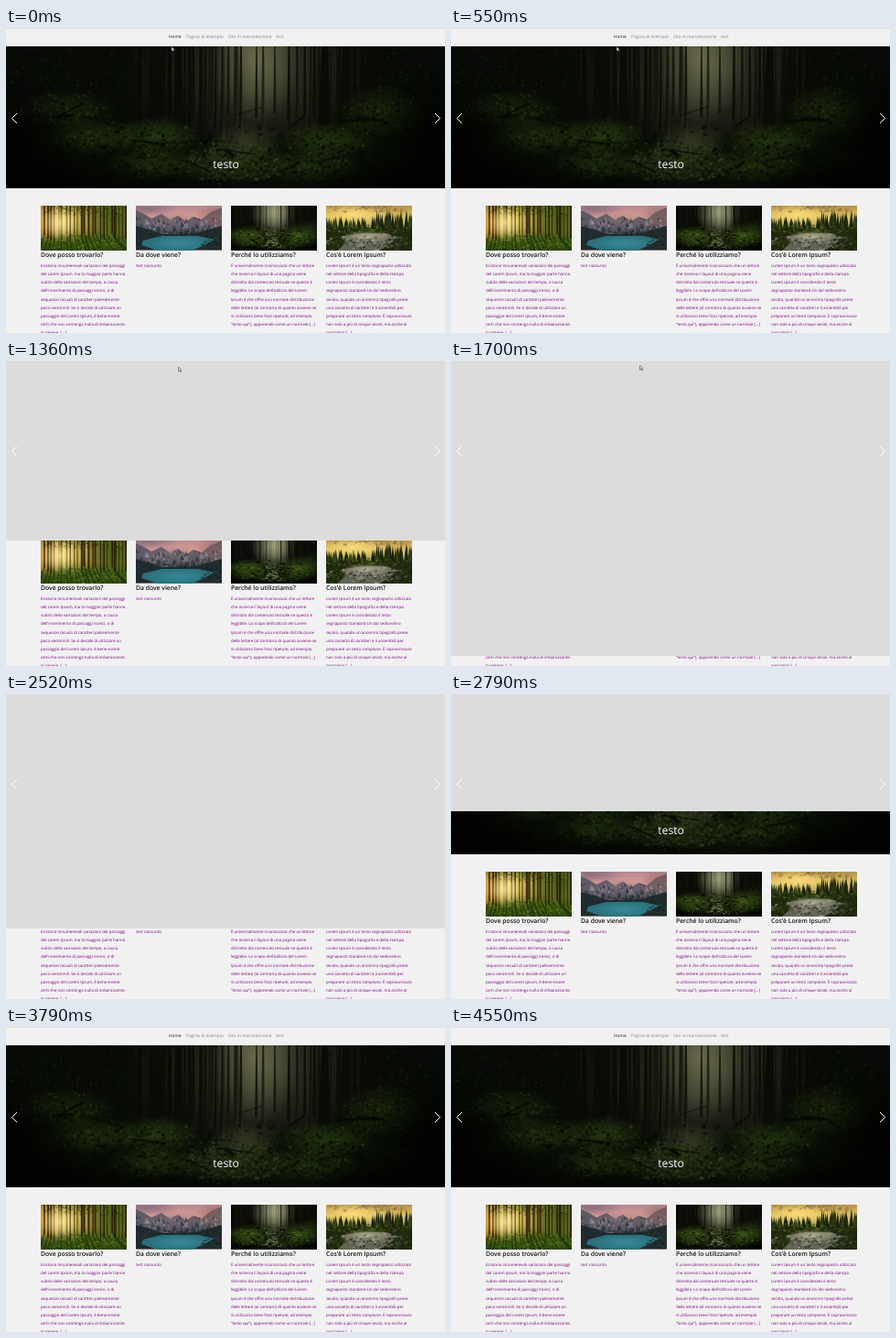
These frames come from a looping animation (480 px wide and 333 px high, 4610 ms). An HTML page with a canvas:

```html
<!DOCTYPE html>
<html lang="it">
<head>
<meta charset="utf-8">
<title>Transizione di pagina</title>
<style>
html, body { margin: 0; width: 100%; height: 100%; overflow: hidden; background: #f1f1f1; }
canvas { display: block; width: 480px; height: 333px; }
</style>
</head>
<body>
<canvas id="stage" width="480" height="333"></canvas>
<script>
const W = 480, H = 333, LOOP = 4610;
const ctx = document.getElementById('stage').getContext('2d');

function layer(w, h, paint) {
  const c = document.createElement('canvas');
  c.width = w;
  c.height = h;
  paint(c.getContext('2d'), w, h);
  return c;
}

function seeded(a) {
  return () => {
    a = (a + 0x6D2B79F5) | 0;
    let t = Math.imul(a ^ (a >>> 15), 1 | a);
    t = (t + Math.imul(t ^ (t >>> 7), 61 | t)) ^ t;
    return ((t ^ (t >>> 14)) >>> 0) / 4294967296;
  };
}

function glow(g, x, y, rx, ry, rgb, alpha) {
  g.save();
  g.translate(x, y);
  g.scale(rx, ry);
  const r = g.createRadialGradient(0, 0, 0, 0, 0, 1);
  r.addColorStop(0, `rgba(${rgb},${alpha})`);
  r.addColorStop(0.5, `rgba(${rgb},${alpha * 0.55})`);
  r.addColorStop(1, `rgba(${rgb},0)`);
  g.fillStyle = r;
  g.fillRect(-1, -1, 2, 2);
  g.restore();
}

function fade(g, w, h, colors) {
  const l = g.createLinearGradient(0, 0, 0, h);
  colors.forEach((c, i) => l.addColorStop(i / (colors.length - 1), c));
  g.fillStyle = l;
  g.fillRect(0, 0, w, h);
}

function shape(g, color, pts) {
  g.fillStyle = color;
  g.beginPath();
  for (let i = 0; i < pts.length; i += 2) g.lineTo(pts[i], pts[i + 1]);
  g.fill();
}

// Scatter small specks inside an ellipse, denser towards its middle.
function specks(g, rnd, n, x, y, rx, ry, size, color) {
  for (let i = 0; i < n; i++) {
    const a = rnd() * 6.283, r = Math.pow(rnd(), 0.7);
    g.fillStyle = color(rnd());
    g.beginPath();
    g.ellipse(x + Math.cos(a) * r * rx, y + Math.sin(a) * r * ry,
      size * (0.6 + rnd()), size * (0.3 + rnd() * 0.5), rnd() - 0.5, 0, 6.283);
    g.fill();
  }
}

const tone = (hue, sat, low, range, alpha = 0.6) => v => `hsla(${hue},${sat}%,${low + v * range}%,${alpha})`;
const moss = tone(84, 52, 5, 17);
const fern = tone(100, 40, 3, 9);
const stone = tone(72, 14, 5, 20);
const shade = v => `rgba(3,6,2,${0.3 + v * 0.5})`;

// A mossy mound: soft light, leaf texture, then dark gaps.
function mound(g, rnd, x, y, rx, ry, light) {
  glow(g, x, y, rx * 1.2, ry * 1.3, '50,72,20', light);
  specks(g, rnd, rx * ry * 0.16, x, y, rx, ry, 1.3, moss);
  specks(g, rnd, rx * ry * 0.08, x, y + ry * 0.4, rx, ry, 1.6, shade);
}

const forest = layer(480, 155, (g, w, h) => {
  const rnd = seeded(11);
  g.fillStyle = '#070a06';
  g.fillRect(0, 0, w, h);
  glow(g, 288, 22, 115, 95, '70,74,52', 0.7);
  glow(g, 272, 12, 50, 75, '135,135,98', 0.65);
  glow(g, 195, 35, 75, 70, '42,50,26', 0.5);
  specks(g, rnd, 500, 75, 45, 95, 55, 1.5, fern);
  specks(g, rnd, 300, 405, 45, 80, 50, 1.5, fern);

  for (let i = 0; i < 78; i++) {
    const x = 60 + rnd() * 345, mid = Math.max(0, 1 - Math.abs(x - 275) / 110);
    const foot = 72 + rnd() * 32, wide = 0.8 + rnd() * (3.6 - mid * 1.8);
    shape(g, `hsla(62,20%,${3 + mid * 7 * rnd()}%,.85)`, [x, 0, x + wide, 0, x + wide + 1, foot, x - 1, foot]);
    g.fillStyle = `rgba(112,110,78,${mid * 0.3})`;
    g.fillRect(x + wide, 0, 0.7, foot);
  }
  for (const [x, wide] of [[128, 12], [158, 6], [186, 5], [345, 7], [368, 6]])
    shape(g, '#080b06', [x, 0, x + wide, 0, x + wide + 3, 104, x - 4, 104]);

  shape(g, 'rgba(9,15,5,.85)', [0, 86, 70, 72, 140, 84, 215, 104, 250, 108, 285, 98, 335, 96, 375, 78, 425, 58, 480, 50, 480, 155, 0, 155]);
  mound(g, rnd, 62, 68, 48, 17, 0.4);
  mound(g, rnd, 95, 98, 48, 16, 0.45);
  mound(g, rnd, 165, 98, 42, 17, 0.65);
  mound(g, rnd, 160, 128, 46, 15, 0.45);
  mound(g, rnd, 350, 103, 45, 16, 0.65);
  mound(g, rnd, 410, 72, 42, 24, 0.4);
  mound(g, rnd, 335, 131, 48, 16, 0.5);
  mound(g, rnd, 250, 127, 58, 20, 0.6);
  glow(g, 262, 104, 42, 22, '86,92,58', 0.5);
  specks(g, rnd, 240, 245, 128, 52, 24, 2, stone);
  specks(g, rnd, 150, 262, 120, 62, 26, 1.5, moss);
  specks(g, rnd, 200, 240, 118, 210, 36, 2.2, shade);

  g.strokeStyle = 'rgba(5,8,4,.85)';
  for (let i = 0; i < 16; i++) {
    const x = 30 + rnd() * 400, y = 75 + rnd() * 60;
    g.lineWidth = 0.8 + rnd() * 2;
    g.beginPath();
    g.moveTo(x, y);
    g.lineTo(x + 15 + rnd() * 35, y + rnd() * 30 - 15);
    g.stroke();
  }

  glow(g, 0, 110, 90, 85, '0,0,0', 0.9);
  glow(g, 480, 105, 85, 90, '0,0,0', 0.95);
  glow(g, 40, 155, 150, 42, '0,0,0', 1);
  glow(g, 440, 155, 140, 40, '0,0,0', 1);
  glow(g, 200, 162, 120, 24, '0,0,0', 0.7);
});

const sunnyWood = (g, w, h) => {
  const rnd = seeded(5);
  fade(g, w, h, ['#5c641a', '#8c842a', '#7c7a20', '#3d5a12', '#2f4d0c']);
  glow(g, 24, 16, 42, 27, '255,220,110', 0.9);
  glow(g, 4, 20, 18, 24, '225,145,35', 0.7);
  glow(g, 82, 12, 34, 30, '58,84,20', 0.85);
  specks(g, rnd, 260, 47, 40, 50, 9, 1.4, tone(80, 62, 10, 28, 0.65));
  specks(g, rnd, 200, 55, 3, 54, 10, 1.4, tone(70, 58, 10, 26, 0.6));
  for (let i = 0; i < 23; i++) {
    const x = 1 + i * 4.1 + rnd() * 2.5, foot = 30 + rnd() * 10, wide = 0.7 + rnd() * 1.9;
    g.fillStyle = `rgba(${34 + rnd() * 22},28,9,.9)`;
    g.fillRect(x, 0, wide, foot);
    shape(g, 'rgba(18,32,6,.5)', [x, foot, x + wide, foot, x + (x - 24) * 0.25 + wide, 49, x + (x - 24) * 0.25, 49]);
  }
  glow(g, 20, 19, 20, 18, '255,238,160', 0.8);
};

const lake = (g, w, h) => {
  const rnd = seeded(8);
  fade(g, w, h, ['#b98791', '#dba193', '#c9908a', '#7d6c74']);
  glow(g, 12, 3, 35, 9, '118,96,118', 0.7);
  shape(g, '#5d5a64', [0, 5, 9, 9, 17, 14, 28, 9, 37, 15, 46, 11, 55, 17, 63, 12, 72, 15, 82, 7, 94, 2, 94, 36, 0, 36]);
  glow(g, 88, 12, 24, 16, '140,98,92', 0.7);
  glow(g, 40, 16, 34, 8, '140,118,124', 0.5);
  for (let i = 0; i < 95; i++) {
    const x = rnd() * 94, y = 11 + rnd() * 17, s = 1 + rnd() * 3;
    shape(g, rnd() > 0.62 ? 'rgba(165,160,168,.5)' : 'rgba(36,42,50,.55)', [x, y, x + s, y + s * 1.6, x - s * 0.4, y + s * 1.8]);
  }
  shape(g, '#1f2b2d', [0, 22, 14, 26, 30, 31, 50, 31, 70, 29, 94, 22, 94, 48, 0, 48]);
  specks(g, rnd, 110, 47, 30, 48, 4, 1.2, tone(165, 20, 8, 16));
  shape(g, '#29717d', [8, 38, 28, 33, 68, 33, 86, 37, 72, 44, 62, 49, 24, 49, 6, 43]);
  glow(g, 47, 41, 34, 8, '62,148,158', 0.7);
  specks(g, rnd, 70, 90, 42, 18, 8, 1.3, tone(170, 18, 8, 18));
};

const smallForest = g => {
  const rnd = seeded(31);
  g.drawImage(forest, 115, 0, 302, 155, 0, 0, 94, 49);
  glow(g, 46, 8, 24, 24, '190,192,150', 0.65);
  for (let i = 0; i < 22; i++) {
    g.fillStyle = 'rgba(14,17,8,.75)';
    g.fillRect(rnd() * 94, 0, 0.6 + rnd() * 1.6, 24 + rnd() * 8);
  }
  glow(g, 22, 33, 28, 12, '80,115,28', 0.55);
  glow(g, 76, 32, 28, 14, '76,110,28', 0.55);
  specks(g, rnd, 150, 47, 35, 46, 12, 1.3, tone(82, 50, 8, 24));
  specks(g, rnd, 45, 46, 38, 13, 10, 1.3, tone(70, 15, 18, 40));
  specks(g, rnd, 110, 47, 36, 48, 13, 1.3, shade);
};

const river = (g, w, h) => {
  const rnd = seeded(23);
  fade(g, w, h, ['#b99243', '#e0c264', '#b7a850', '#3e481d', '#2b3514']);
  glow(g, 30, 9, 36, 11, '255,225,125', 0.85);
  specks(g, rnd, 60, 45, 3, 50, 4, 1.8, tone(38, 35, 30, 28, 0.5));
  for (let i = 0; i < 75; i++) {
    const x = rnd() * 94, tall = (x > 50 ? 14 : 7) + rnd() * 9;
    shape(g, `hsl(${74 + rnd() * 18},45%,${7 + rnd() * 13}%)`, [x, 27 - tall, x + 2.6, 30, x - 2.6, 30]);
  }
  shape(g, '#1f290d', [0, 24, 94, 24, 94, 49, 0, 49]);
  specks(g, rnd, 170, 47, 26, 50, 5, 1.3, tone(78, 52, 9, 24));
  shape(g, '#626456', [14, 34, 38, 30, 66, 30, 80, 35, 70, 42, 58, 49, 12, 49, 22, 40]);
  glow(g, 45, 34, 28, 7, '200,194,158', 0.8);
  specks(g, rnd, 130, 46, 40, 46, 9, 1.5, tone(58, 10, 8, 58));
  specks(g, rnd, 90, 82, 41, 20, 9, 1.5, tone(82, 38, 5, 17));
  specks(g, rnd, 60, 8, 41, 16, 9, 1.5, tone(82, 42, 7, 20));
};

const cards = [
  [38, sunnyWood, 'Dove posso trovarlo?', [
    'Esistono innumerevoli variazioni dei passaggi',
    'del Lorem Ipsum, ma la maggior parte hanno',
    'subito delle variazioni del tempo, a causa',
    "dell'inserimento di passaggi ironici, o di",
    'sequenze casuali di caratteri palesemente',
    'poco verosimili. Se si decide di utilizzare un',
    'passaggio del Lorem Ipsum, è bene essere',
    'certi che non contenga nulla di imbarazzante.',
    'In genere, [...]']],
  [142, lake, 'Da dove viene?', ['test riassunto']],
  [246, smallForest, 'Perché lo utilizziamo?', [
    'È universalmente riconosciuto che un lettore',
    'che osserva il layout di una pagina viene',
    'distratto dal contenuto testuale se questo è',
    "leggibile. Lo scopo dell'utilizzo del Lorem",
    'Ipsum è che offre una normale distribuzione',
    'delle lettere (al contrario di quanto avviene se',
    'si utilizzano brevi frasi ripetute, ad esempio',
    '“testo qui”), apparendo come un normale [...]']],
  [350, river, "Cos'è Lorem Ipsum?", [
    'Lorem Ipsum è un testo segnaposto utilizzato',
    'nel settore della tipografia e della stampa.',
    'Lorem Ipsum è considerato il testo',
    'segnaposto standard sin dal sedicesimo',
    'secolo, quando un anonimo tipografo prese',
    'una cassetta di caratteri e li assemblò per',
    'preparare un testo campione. È sopravvissuto',
    'non solo a più di cinque secoli, ma anche al',
    'passaggio [...]']]
];

function text(g, str, x, y, size, color, weight = 400) {
  g.font = `${weight} ${size}px "Open Sans", "Noto Sans", sans-serif`;
  g.textRendering = 'geometricPrecision';
  g.fillStyle = color;
  g.fillText(str, x, y);
}

const page = layer(W, H, g => {
  g.fillStyle = '#f1f1f1';
  g.fillRect(0, 0, W, H);
  g.fillStyle = '#e4dcdf';
  g.fillRect(0, 0, W, 1);
  text(g, 'Home', 178, 11.2, 4.8, '#222');
  text(g, 'Pagina di esempio', 197, 11.2, 4.8, '#858585');
  text(g, 'Sito in manutenzione', 243, 11.2, 4.8, '#858585');
  text(g, 'test', 295, 11.2, 4.8, '#858585');

  g.drawImage(forest, 0, 20.4);
  g.textAlign = 'center';
  text(g, 'testo', 240.6, 153, 12.2, '#fff');
  g.textAlign = 'left';

  for (const [x, paint, title, lines] of cards) {
    g.drawImage(layer(94, 49, paint), x, 194, 93.5, 48.5);
    text(g, title, x, 249.9, 6.8, '#111', 600);
    lines.forEach((s, i) => text(g, s, x, 260.6 + i * 9.23, 4.4, '#800080'));
  }
});

// CSS "ease" curve
function ease(t) {
  if (t <= 0) return 0;
  if (t >= 1) return 1;
  let lo = 0, hi = 1, u = t;
  for (let i = 0; i < 24; i++) {
    u = (lo + hi) / 2;
    const x = 0.75 * u * (1 - u) + u * u * u;
    if (x < t) lo = u; else hi = u;
  }
  return 0.3 * u * (1 - u) ** 2 + 3 * u * u * (1 - u) + u ** 3;
}

const span = (t, from, to) => Math.min(1, Math.max(0, (t - from) / (to - from)));
const smooth = k => k * k * (3 - 2 * k);

function sheetEdge(t) {
  if (t < 2200) return H * ease((t - 1088) / 800);
  return H * (1 - ease((t - 2268) / 1470));
}

function chevron(x, dir) {
  ctx.beginPath();
  ctx.moveTo(x, 93);
  ctx.lineTo(x + 5.5 * dir, 98.5);
  ctx.lineTo(x, 104);
  ctx.strokeStyle = '#fff';
  ctx.lineWidth = 1;
  ctx.stroke();
}

function cursor(t) {
  const up = smooth(span(t, 730, 950)), away = smooth(span(t, 1250, 1650));
  ctx.save();
  ctx.translate(181 + 3.5 * up + 22 * away, 20.5 - 13.5 * up - 2 * away);
  ctx.beginPath();
  for (const [x, y] of [[0, 0], [0, 4.6], [1.1, 3.7], [1.9, 5.3], [2.6, 5], [1.9, 3.4], [3.3, 3.3]]) ctx.lineTo(x, y);
  ctx.closePath();
  ctx.fillStyle = '#fff';
  ctx.fill();
  ctx.strokeStyle = '#333';
  ctx.lineWidth = 0.6;
  ctx.stroke();
  ctx.restore();
}

function draw(t) {
  ctx.drawImage(page, 0, 0);
  if (t > 1020 && t < 1880) {
    ctx.strokeStyle = '#777';
    ctx.lineWidth = 0.8;
    ctx.strokeRect(175, 4.5, 19.5, 11.3);
  }
  if (t > 850 && t < 1230) {
    ctx.fillStyle = '#7a7c80';
    ctx.fillRect(0, 327.5, 46, 5.5);
    text(ctx, 'localhost/pagina/home/', 1, 331.8, 4, '#dadada');
  }
  const edge = Math.round(sheetEdge(t));
  ctx.fillStyle = '#dcdcdc';
  ctx.fillRect(0, 0, W, edge);
  chevron(12, -1);
  chevron(469, 1);
  if (t < 1880) cursor(t);
}

const start = performance.now();
function tick() {
  draw((performance.now() - start) % LOOP);
  requestAnimationFrame(tick);
}
tick();
</script>
</body>
</html>
```
